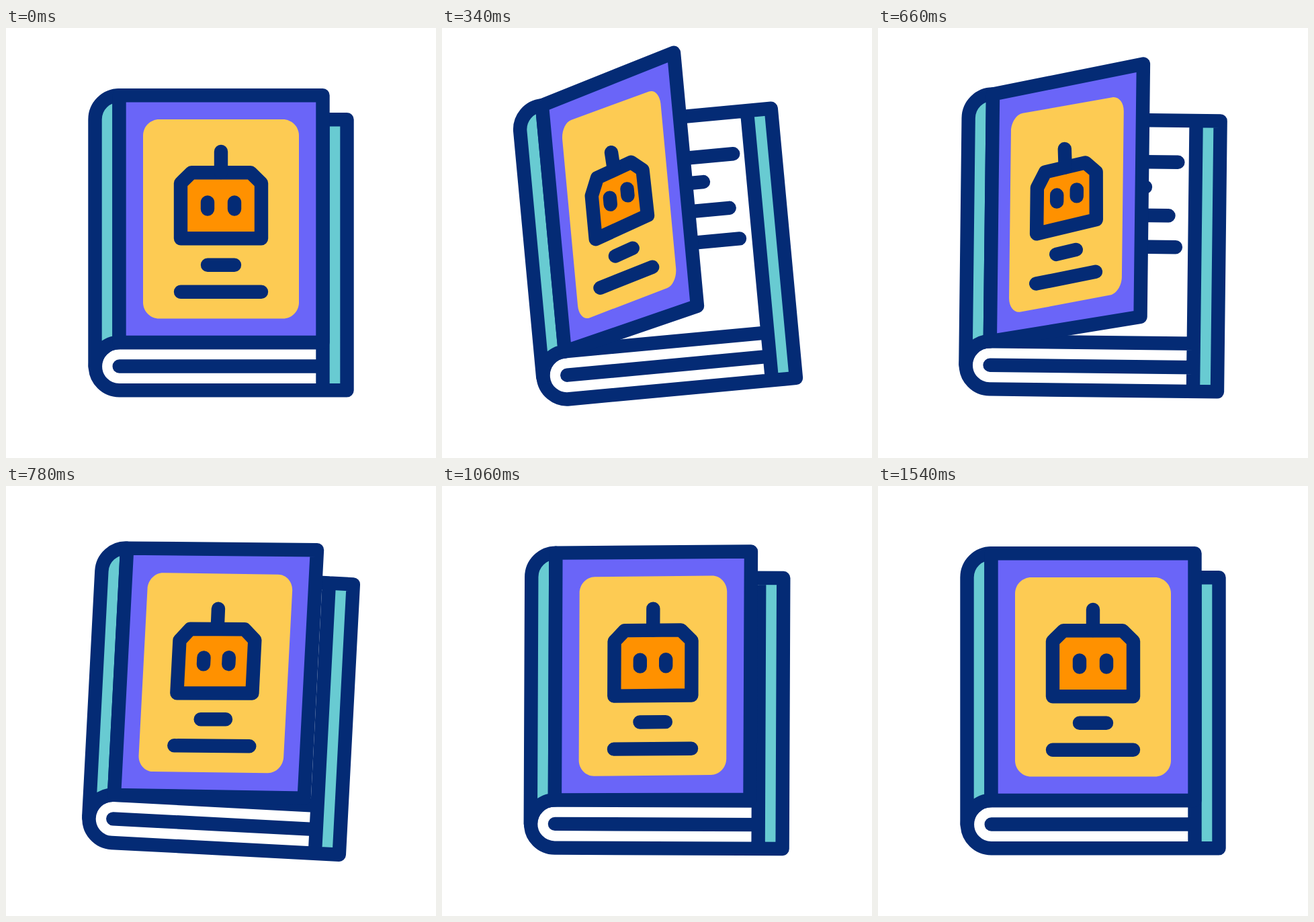
Recreate the animation shown at these times as an HTML page. Size 640 px wide and 640 px high, loop 2.1 s.

```html
<!DOCTYPE html>
<html lang="en">
<head>
<meta charset="utf-8">
<title>Robot book</title>
<style>
  html, body { margin: 0; width: 100%; height: 100%; overflow: hidden; background: #fff; }
  svg { display: block; width: 100vw; height: 100vh; }
  .ink { fill: none; stroke: #042b75; stroke-width: 20.4; stroke-linecap: round; stroke-linejoin: round; }
</style>
</head>
<body>
<svg viewBox="0 0 640 640">
  <g id="book">
    <!-- back cover and pages -->
    <path fill="#fff" d="M168.5 136H471.5V539.2H168.5A35.6 35.6 0 0 1 168.5 468Z"/>
    <path fill="#68cbd2" d="M471.5 136.3H507.5V539.2H471.5Z"/>
    <path class="ink" d="M300 198.3H445M300 235.8H397M300 278H432M300 324.8H443"/>
    <path class="ink" d="M200 136.3H507.5V539.2H168.5A35.6 35.6 0 0 1 168.5 468H471.5M471.5 136.3V539.2M168.7 503.5H471.5"/>
    <!-- spine -->
    <path fill="#68cbd2" d="M168.5 100.2A36 36 0 0 0 132.5 136.2V503.5A36 36 0 0 1 168.5 468Z"/>
    <path class="ink" d="M168.5 100.2A36 36 0 0 0 132.5 136.2V503.5A36 36 0 0 1 168.5 468Z"/>
    <!-- front cover -->
    <path id="cover" class="ink" style="fill:#6a65f8"/>
    <path id="panel" fill="#fdcb53"/>
    <path id="head" class="ink" style="fill:#ff9100"/>
    <path id="marks" class="ink"/>
  </g>
</svg>
<script>
const LOOP = 2100, HINGE = 168.5, WIDTH = 303;
const $ = id => document.getElementById(id);

const spin = [[0, 0], [433, -6], [775, 3], [1120, 0]];
const swing = [[0, 0], [500, 132], [874, 0]];
const bounce = [[874, 0], [1220, 22.2], [1540, 0]];

// Smooth interpolation between [time, value] keys
function ease(keys, t) {
  if (t <= keys[0][0]) return keys[0][1];
  for (let i = 1; i < keys.length; i++) {
    const [t0, a] = keys[i - 1], [t1, b] = keys[i];
    if (t < t1) {
      const u = (t - t0) / (t1 - t0);
      return a + (b - a) * u * u * (3 - 2 * u);
    }
  }
  return keys[keys.length - 1][1];
}

// A point at rest plus its drift per unit of swing (sx, sy) and bounce (bx, by)
function pin(x, y, sy, sx = (HINGE - x) / WIDTH, bx = sx, by = 0.46 * sy) {
  return (s, b) => [x + s * sx + b * bx, y + s * sy + b * by];
}

const cover = [
  pin(HINGE, 100.2, 0), pin(471.5, 100.2, -0.597, -1, -1, -0.268),
  pin(471.5, 468, -0.489, -1, -1, -0.15), pin(HINGE, 468, 0)
];
const panel = [
  pin(204, 136, -0.06, -0.1, 0, 0), pin(436, 136, -0.455, -0.91, -1, -0.25),
  pin(436, 432.5, -0.485, -0.91, -1, -0.25), pin(204, 432.5, -0.065, -0.1, 0, 0)
];
const head = [
  pin(260, 313.3, -0.075), pin(260, 231, 0.1), pin(276, 215.3, 0),
  pin(364, 215.3, -0.185, -0.71), pin(380, 231, -0.212, -0.71), pin(380, 313.3, -0.355)
];
const antenna = [pin(320, 184, -0.045, -0.55, -0.5, -0.11), pin(320, 215, -0.092, -0.535, -0.5)];
const eyes = [pin(300, 264.5, -0.13), pin(340, 264.5, -0.237)];
const bars = [
  [pin(300, 352.7, -0.19), pin(340, 352.7, -0.283)],
  [pin(260, 392.7, -0.14), pin(380, 392.7, -0.376)]
];

const fmt = p => p[0].toFixed(2) + " " + p[1].toFixed(2);
const line = pts => "M" + pts.map(fmt).join("L");
const mix = (a, b, k) => [a[0] + (b[0] - a[0]) * k, a[1] + (b[1] - a[1]) * k];

// Closed four-sided shape with rounded corners
function rounded(q, fx, fy) {
  return q.map((c, i) => {
    const prev = q[(i + 3) % 4], next = q[(i + 1) % 4];
    const [fp, fn] = i % 2 ? [fx, fy] : [fy, fx];
    const curve = [mix(c, prev, fp * 0.45), mix(c, next, fn * 0.45), mix(c, next, fn)];
    return (i ? "L" : "M") + fmt(mix(c, prev, fp)) + "C" + curve.map(fmt).join(" ");
  }).join("") + "Z";
}

function draw(t) {
  const s = ease(swing, t), b = ease(bounce, t);
  const place = pts => pts.map(p => p(s, b));
  $("book").setAttribute("transform", `rotate(${ease(spin, t).toFixed(3)} 320 320)`);
  $("cover").setAttribute("d", line(place(cover)) + "Z");
  $("panel").setAttribute("d", rounded(place(panel), 24 / 232, 24 / 296));
  $("head").setAttribute("d", line(place(head)) + "Z");
  $("marks").setAttribute("d",
    line(place(antenna)) +
    place(eyes).map(([x, y]) => line([[x, y - 5], [x, y + 5]])).join("") +
    bars.map(bar => line(place(bar))).join(""));
}

const start = performance.now();
function tick() {
  draw((performance.now() - start) % LOOP);
  requestAnimationFrame(tick);
}
draw(0);
requestAnimationFrame(tick);
</script>
</body>
</html>
```
